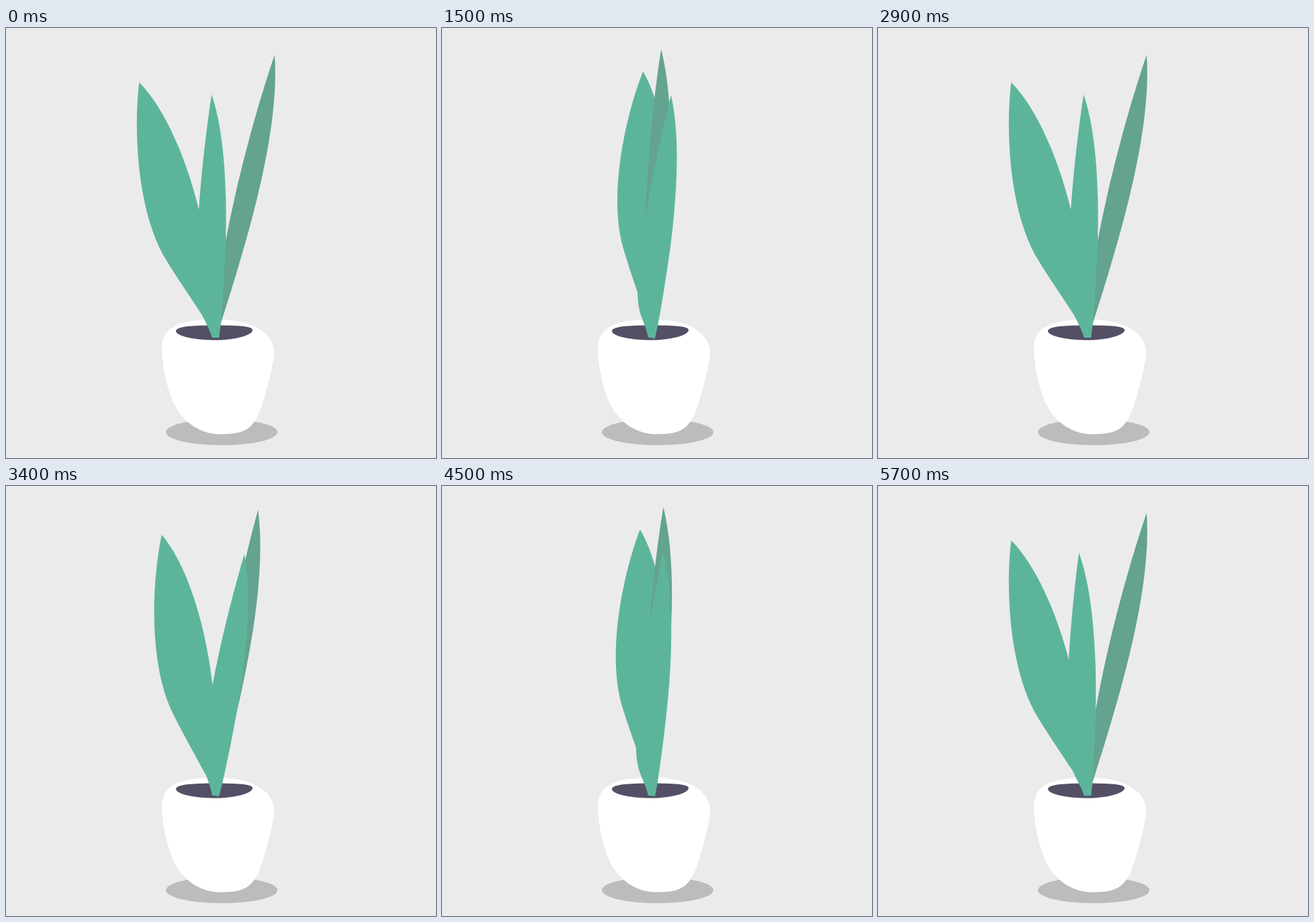
Recreate the animation shown at these times as an HTML page. Size 640 by 640 pixels, loop 5800 ms.

```html
<!DOCTYPE html>
<html lang="en">
<head>
<meta charset="utf-8">
<title>Potted plant</title>
<style>
  html, body { margin: 0; width: 100%; height: 100%; overflow: hidden; background: #ebebeb; }
  svg { display: block; width: 100%; height: 100%; }
</style>
</head>
<body>
<svg viewBox="0 0 640 640">
  <ellipse cx="321" cy="601.5" rx="83" ry="19.5" fill="#bcbcbc"/>
  <path fill="#fff" d="M232 480C231 448 252 434 314 434C371 434 399 456 399 484C399 496 391 527 385 548C372 594 361 604.5 320 604.5C289 604.5 266 587 253 565C240 541 233 506 232 480Z"/>
  <path fill="#544f65" d="M253 451C253 444 280 442.500 310 442.500C345 442.500 367 443.500 367 449.500C367 457 342 464.500 312 464.500C280 464.500 253 458.500 253 451Z"/>
  <path id="left" fill="#5cb59b" d="M198 81C190 145 193 275 240 348C254 371 278 406 295 432Q301 443 307 461L317 461C312 400 301 330 287 271C270 200 238 121 198 81Z"/>
  <path id="right" fill="#64a38f" d="M400 40C408 155 361 310 319 442L317 461L311 461C314 430 316 390 321 352C335 262 369 130 400 40Z"/>
  <path id="middle" fill="#5cb59b" d="M306 99C322 145 328 215 327.500 290C327 345 322 415 319.500 442L317 461L307 461C304 451 297 438 292 427C288 417 284.500 402 284 385C282 320 288 220 306 99Z"/>
</svg>
<script>
const LOOP = 5800;
const STEP = 100;
const POSES = 43;   // drawn poses per sway, 15 per second
const PERIOD = 72;  // sway length in ticks, 25 per second

const [left, right, middle] = ["left", "right", "middle"].map(id => document.getElementById(id));

// Eased 0..1..0 wave that reaches 1 at the given tick.
function sway(tick, peak) {
  const gap = Math.abs(tick - peak);
  const u = 1 - Math.min(gap, PERIOD - gap) / (PERIOD / 2);
  return u * u * (3 - 2 * u);
}

function turn(leaf, degrees) {
  leaf.setAttribute("transform", `rotate(${degrees.toFixed(3)} 312 461)`);
}

function draw(time) {
  const step = Math.floor((time % LOOP) / STEP);
  const pose = Math.floor(step * 1.5) % POSES;
  const tick = Math.round(pose * 5 / 3);
  const outer = sway(tick, 35);
  turn(left, 15 * outer);
  turn(right, -10 * outer);
  turn(middle, 15 * (sway(tick, 23) - sway(0, 23)));
}

const start = performance.now();
function frame() {
  draw(performance.now() - start);
  requestAnimationFrame(frame);
}
frame();
</script>
</body>
</html>
```
